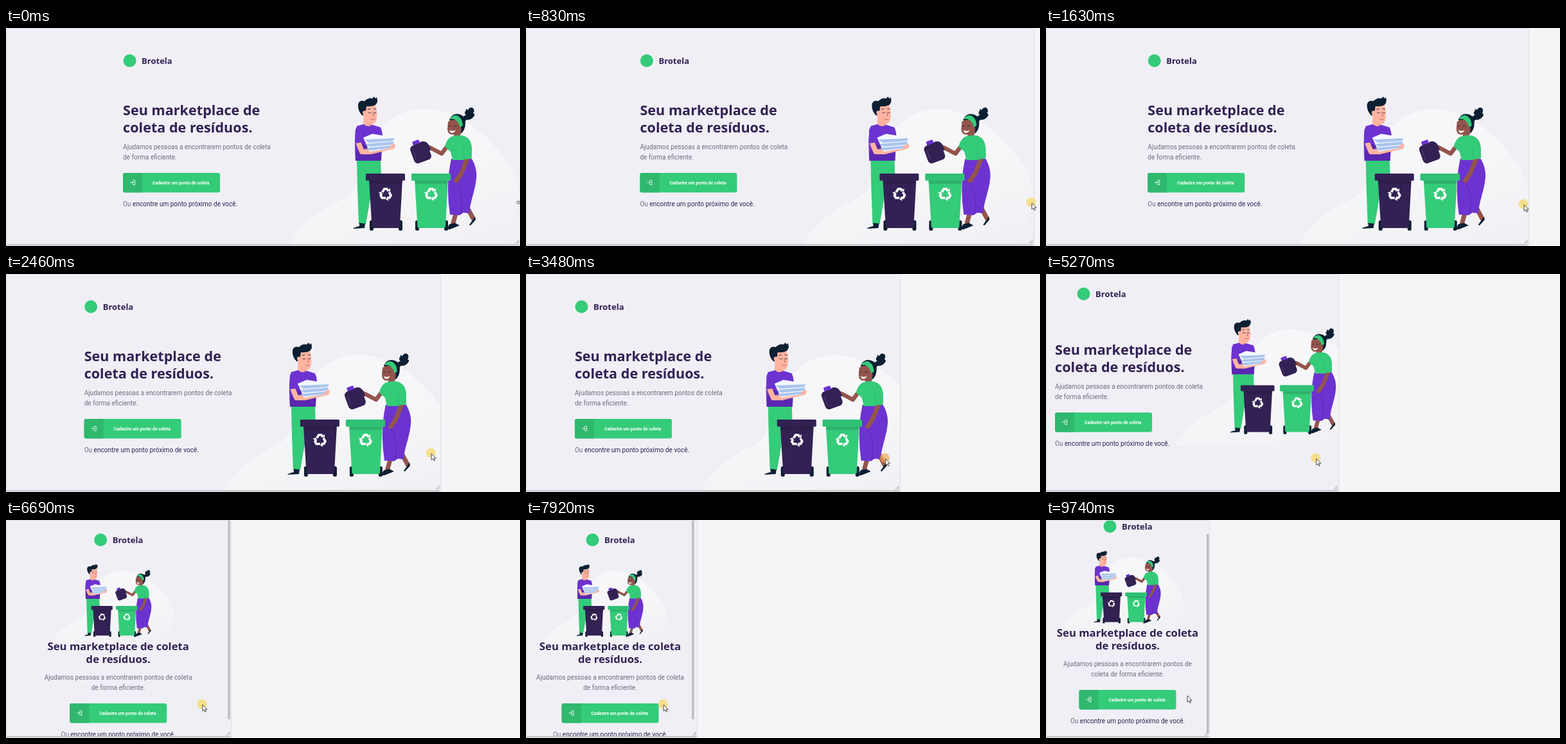
Recreate the animation shown at these times as an HTML page. Size 800 px wide and 340 px high, loop 9.93 s.

```html
<!DOCTYPE html>
<html lang="pt-BR">
<head>
<meta charset="utf-8">
<style>
  html, body { margin: 0; width: 100%; height: 100%; overflow: hidden; background: #f5f5f7; }
  svg { display: block; }
  #page { overflow: hidden; }
  text { font-family: Roboto, sans-serif; font-size: 10.05px; fill: #6c6c80; }
  .heading { font-family: "Noto Sans", "Open Sans", sans-serif; font-weight: 700; fill: #322153; }
  .dark { fill: #322153; }
  .line { fill: none; stroke-linecap: round; stroke-linejoin: round; }
</style>
</head>
<body>
<svg width="800" height="340" viewBox="0 0 800 340">
  <defs>
    <linearGradient id="glow" x1=".3" y1="0" x2=".75" y2="1">
      <stop offset="0" stop-color="#f8f8fa"/>
      <stop offset=".55" stop-color="#f6f6f8"/>
      <stop offset="1" stop-color="#f1f1f5"/>
    </linearGradient>
    <filter id="soft" x="-5%" y="-5%" width="110%" height="110%"><feGaussianBlur stdDeviation="1.2"/></filter>
    <g id="arm">
      <path d="M-5.2-3L-2.2-8H2L3.600-5.600" fill="none" stroke="#fff" stroke-width="3.6"/>
      <path d="M1.200-4.200H7L7.300-9Z" fill="#fff"/>
    </g>
    <g id="recycle">
      <use href="#arm"/><use href="#arm" transform="rotate(120)"/><use href="#arm" transform="rotate(240)"/>
    </g>
    <g id="bin">
      <rect x="6" y="73" width="6" height="16" rx="2.5" fill="#0c1f33"/>
      <rect x="51" y="73" width="6" height="16" rx="2.5" fill="#0c1f33"/>
      <path d="M5 9H57L53 83Q52.700 85 50.500 85H12Q9.800 85 9.500 83Z"/>
      <path d="M5.300 11H56.700L56.400 16H5.700Z" fill="#000" opacity=".12"/>
      <rect width="61" height="11" rx="1.5"/>
      <use href="#recycle" x="31" y="32"/>
    </g>
  </defs>

  <rect width="800" height="340" fill="#f5f5f7"/>
  <rect id="shadow" y="1" height="338" fill="#bcbcc2" filter="url(#soft)"/>
  <svg id="page" height="337">
    <rect width="800" height="337" fill="#f0eff5"/>

    <g id="art">
      <path fill="url(#glow)" d="M442 337C462 300 492 282 522 268C552 252 548 226 566 188C582 150 612 127 648 126C690 126 724 148 750 173C780 202 802 238 798 268C795 296 782 322 772 337Z"/>

      <g id="man">
        <path fill="#34cb79" d="M546 206H583L584 232L568 260L560 306H549L547 250Z"/>
        <path fill="#0c1f33" d="M550 304L559 305L558 312L540 313Q541 311 550 309Z"/>
        <path fill="#ffb4a0" d="M557 120H575Q578 130 577 141Q575 151 568 150L570 156H556Z"/>
        <path fill="#e98f7e" d="M560 145Q564 151 569 150V154Z"/>
        <path fill="#0c1f33" d="M555 137Q547 129 548 119Q550 112 558 114Q564 108 570 110L573 107L575 110L577 108Q580 115 575 120Q569 123 561 122L560 129Z"/>
        <circle cx="558" cy="132" r="3" fill="#ffb4a0"/>
        <path class="line" stroke="#0c1f33" stroke-width=".8" d="M564 132q2 1.500 4 0M572 132q2 1.300 4 0M563 127l4-1M572 126l4 .500"/>
        <path class="line" stroke="#c05f58" stroke-width=".9" d="M568 142q3 2 6 0M571 133l2 4h-2"/>
        <path fill="#6c33d0" d="M546 153L557 150Q562 156 570 151L583 155Q587 164 586 176L584 207H544Q542 180 544 160Z"/>
        <path fill="#5a28b0" d="M552 180L584 189V207H544V196Z"/>
        <path class="line" stroke="#ffb4a0" stroke-width="8" d="M548 178L554 193H567L600 185"/>
        <path fill="#6c33d0" d="M544 157Q554 155 557 164V178L543 180Z"/>
        <path fill="#f4f7fd" d="M556 171L570 165L606 171L603 187L566 193Z"/>
        <path fill="#a9c4ee" d="M558 174L605 172L602 176L565 179ZM559 181L604 177L602 182L566 185ZM560 187L604 183L601 187L567 191Z"/>
        <path fill="#ffb4a0" d="M598 184L605 180Q607 184 604 188L597 190Z"/>
      </g>

      <g id="woman">
        <path class="line" stroke="#93544c" stroke-width="6.500" d="M687 184L678 196L661 187"/>
        <path class="line" stroke="#93544c" stroke-width="4" d="M663 188L657 184"/>
        <path class="line" stroke="#93544c" stroke-width="7" d="M701 286L696 304M718 280L727 297"/>
        <path fill="#0c1f33" d="M690 306L699 304L706 308L691 314H686ZM730 294L731 299L723 308L721 307Z"/>
        <path fill="#6c33d0" d="M693 204H725Q734 220 732 235C730 255 723 268 721 289L712 288L706 292L691 291Q684 245 693 204Z"/>
        <path class="line" stroke="#5a28b0" d="M701 240Q713 258 708 289"/>
        <path fill="#0c1f33" d="M710 142Q712 136 716 136Q712 132 716 129Q715 124 719 128Q722 122 727 125Q730 129 727 133Q731 134 728 138Q724 144 717 143L713 147Z"/>
        <path fill="#0c1f33" d="M690 143Q694 134 702 134Q715 135 715 148Q715 161 706 166Z"/>
        <path fill="#93544c" d="M688 146Q697 140 706 146L709 158L707 168L711 171H697V166Q688 168 687 158Z"/>
        <path fill="#34cb79" d="M691 142Q694 136 701 136Q710 139 711 152L707 155Q704 145 697 142Z"/>
        <path class="line" stroke="#0c1f33" stroke-width=".8" d="M689 153q2-1 3 0M697 153q2-1.300 4 0"/>
        <path fill="#fff" d="M690 159Q695 162 700 159Q697 165 692 163Z"/>
        <path fill="#34cb79" d="M692 170Q700 166 712 168Q724 172 725 187V203L719 206H695L692 193L683 185Q685 175 692 170Z"/>
        <path class="line" stroke="#93544c" stroke-width="7" d="M719 201L709 226L701 238"/>
        <path fill="#34cb79" d="M711 187L725 186V203L714 205Z"/>
        <path class="line" stroke="#2fb86e" d="M712 188L713 204"/>
      </g>

      <g id="jug" transform="translate(645 193) rotate(-20)">
        <path class="line" stroke="#322153" stroke-width="2.500" d="M5-13Q16-14 15 2"/>
        <rect x="-7" y="-19" width="11" height="7" rx="1.500" fill="#6c33d0"/>
        <rect x="-14" y="-13" width="28" height="29" rx="6" fill="#322153"/>
        <path class="line" stroke="#58467a" stroke-width=".8" d="M-10-6V9"/>
      </g>
      <use href="#bin" x="560" y="227" fill="#322153"/>
      <use href="#bin" x="631" y="227" fill="#34cb79"/>
      <rect x="631" y="227" width="61" height="11" rx="1.5" fill="#31c174"/>
    </g>

    <g id="logo">
      <circle cx="10.500" r="10" fill="#34cb79"/>
      <text class="heading" x="29" y="4.800" style="font-size:13px">Brotela</text>
    </g>
    <g id="copy">
      <text id="title1" class="heading"></text>
      <text id="title2" class="heading"></text>
      <text id="para1"></text>
      <text id="para2"></text>
      <text id="link">Ou <tspan class="dark">encontre um ponto próximo de você.</tspan></text>
    </g>
    <g id="button">
      <rect width="151" height="30.500" rx="3" fill="#34cb79"/>
      <path d="M3 0H30V30.500H3Q0 30.500 0 27.500V3Q0 0 3 0Z" fill="#2fb86e"/>
      <path class="line" stroke="#fff" stroke-width=".9" d="M15.500 11.500H18.500V18.500H15.500M11.500 15H16M14.300 13L16.300 15L14.300 17"/>
      <text x="46" y="17.500" style="font-size:6.85px;font-weight:700;fill:#fff">Cadastre um ponto de coleta</text>
    </g>

    <rect id="thumb" width="3.500" height="310" rx="1" fill="#bdbdc4"/>
    <path d="M.5 337V.5H800" fill="none" stroke="#dfdfe4"/>
    <path id="grip" d="M-7 336L-1 330M-4 336L-1 333" stroke="#8b8b95" stroke-width=".9"/>
  </svg>

  <g id="cursor">
    <circle id="halo" cx="-1" cy="-1" r="7.500" opacity=".7"/>
    <path id="arrow" d="M0 0V10L2.400 8L4 11.500L5.500 10.800L4 7.400H7Z" fill="#fff" stroke="#222" stroke-width=".8"/>
    <path id="resize" d="M-3.500 0L-1-2.500V-1H2V-2.500L4.500 0L2 2.500V1H-1V2.500Z" fill="#fff" stroke="#333" stroke-width=".7"/>
  </g>
</svg>
<script>
// The page is dragged narrower in visible steps, then scrolled.
const LOOP = 9930, STEP = 203.5, LEAD = 35;
const SCROLL_STEP = 41, LAST_STEP = 48, SCROLL = 21;
const NARROW = 470, STACKED = 385;
// Speed changes of the drag: [step, page width]
const drag = [[0, 800], [5, 788], [8, 751], [17, 582], [26, 455], [33, 350], [39, 266], [41, 254]];

const $ = id => document.getElementById(id);
const set = (id, attrs) => { for (const k in attrs) $(id).setAttribute(k, attrs[k]); };
const move = (id, x, y) => set(id, { transform: `translate(${x} ${y})` });
const show = (id, on) => set(id, { visibility: on ? 'visible' : 'hidden' });
const clamp = v => Math.min(1, Math.max(0, v));

function pageWidth(step) {
  return drag.slice(1).reduce((width, [end, target], i) => {
    const [start, from] = drag[i];
    return width + (target - from) * clamp((step - start) / (end - start));
  }, drag[0][1]);
}

function write(id, text, y) {
  if ($(id).textContent !== text) $(id).textContent = text;
  set(id, { y });
}

function placeArt(left, bottom, scale) {
  set('art', { transform: `translate(${left} ${bottom}) scale(${scale}) translate(-442 -337)` });
}

function layoutWide(width) {
  const narrow = width < NARROW;
  const left = Math.max(13, .487 * width - 207.5);
  const lift = narrow ? 10 : 0;
  if (narrow) placeArt(.72 * width - 126, 268, .86);
  else placeArt(Math.max(width - 358, .716 * width - 144), 337, 1);
  move('logo', narrow ? left + 34 : left, narrow ? 31 : 51);
  move('copy', left, -lift);
  write('title1', 'Seu marketplace de', 136.4);
  write('title2', 'coleta de resíduos.', 162.6);
  write('para1', 'Ajudamos pessoas a encontrarem pontos de coleta', 189.3);
  write('para2', 'de forma eficiente.', 205.3);
  set('link', { y: 278 });
  move('button', left, 226 - lift);
}

function layoutStacked(width, scroll) {
  const centre = Math.max(127, .52 * width - 7.3);
  const tight = centre < 128.5;
  placeArt(centre - 106, 193.7 - scroll, .543);
  move('logo', centre - 38, 31 - scroll);
  move('copy', centre, -scroll);
  write('title1', 'Seu marketplace de coleta', 203);
  write('title2', 'de resíduos.', 223);
  write('para1', 'Ajudamos pessoas a encontrarem pontos de' + (tight ? '' : ' coleta'), 248.5);
  write('para2', (tight ? 'coleta ' : '') + 'de forma eficiente.', 264.5);
  set('link', { y: 337.8 });
  move('button', centre - 75.5, 286 - scroll);
  move('thumb', centre * 2 - 4, 1 + scroll);
}

function drawCursor(step, width, scroll) {
  const x = 1.0928 * width - 76.5 + .9 * scroll;
  const y = 272 + 16 * clamp(step / 17) ** 2 - .67 * scroll;
  const pressed = step > 15 && step < 19;
  move('cursor', x, y);
  show('arrow', step > 0);
  show('resize', step === 0);
  show('halo', step > 0 && step < SCROLL_STEP);
  set('halo', { fill: pressed ? '#f0a850' : '#f5d95f' });
}

function draw(ms) {
  const step = Math.floor((ms + LEAD) / STEP);
  const width = pageWidth(step);
  const scroll = SCROLL * clamp((step - SCROLL_STEP) / (LAST_STEP - SCROLL_STEP));
  const stacked = width < STACKED;

  set('page', { width });
  set('shadow', { width });
  move('grip', width, 0);
  set('copy', { 'text-anchor': stacked ? 'middle' : 'start' });
  for (const id of ['title1', 'title2']) $(id).style.fontSize = stacked ? '16.7px' : '21.6px';
  show('thumb', stacked);
  if (stacked) layoutStacked(width, scroll);
  else layoutWide(width);
  drawCursor(step, width, scroll);
}

function tick() {
  draw(performance.now() % LOOP);
  requestAnimationFrame(tick);
}
tick();
</script>
</body>
</html>
```
